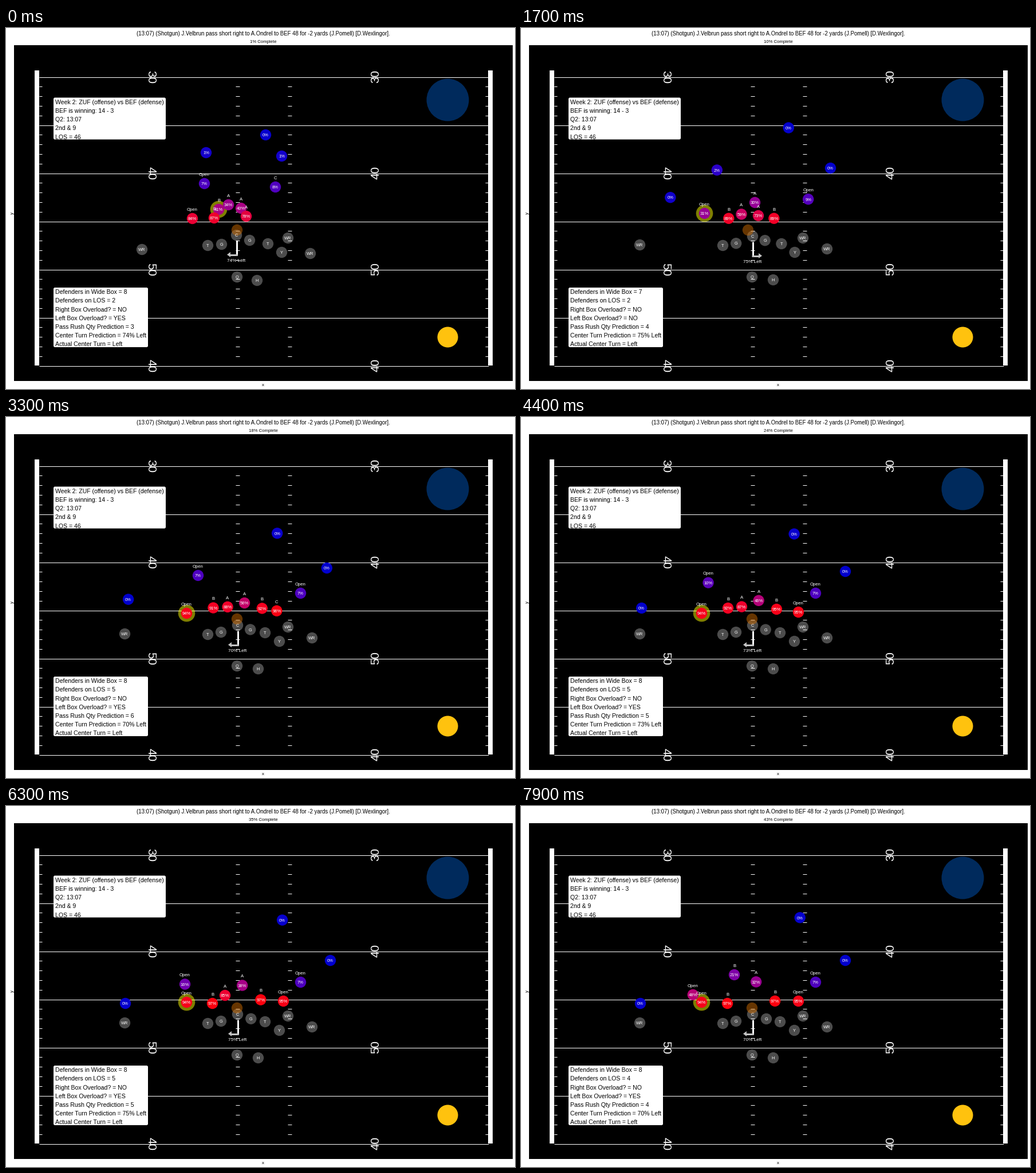
These frames come from a looping animation (889x630 px, 8000 ms). A matplotlib script:

```python
import numpy as np
import matplotlib.pyplot as plt
from matplotlib.animation import FuncAnimation
from matplotlib.patches import Circle, FancyBboxPatch, Polygon, Rectangle

W, H, DPI = 889, 630, 100
FRAMES, STEP = 80, 100
TOP, YARD = 85, 16.8
R = 9.7

plt.rcParams["font.family"] = "Liberation Sans"
fig = plt.figure(figsize=(W / DPI, H / DPI), dpi=DPI, facecolor="white")
ax = fig.add_axes([0, 0, 1, 1])
# Whole coordinates are pixel centres
ax.set_xlim(-0.5, W - 0.5)
ax.set_ylim(H - 0.5, -0.5)
ax.axis("off")


def pt(px):
    return px * 72 / DPI


def text(x, y, s, size, color="white", ha="center"):
    """Text whose capitals are centred on y."""
    return ax.text(x, y + 0.36 * size, s, size=pt(size), color=color, ha=ha,
                   va="baseline", zorder=10)


def turned(x, y, s, size, color, rot):
    ax.text(x, y, s, size=pt(size), color=color, rotation=rot, ha="center",
            va="baseline", rotation_mode="anchor", zorder=3)


def put(label, x, y):
    label.set_position((x, y + 0.36 * label.get_size() * DPI / 72))


def disc(r, color, z, alpha=1, at=(0, 0)):
    return ax.add_patch(Circle(at, r, fc=color, lw=0, alpha=alpha, zorder=z))


def rect(x0, y0, x1, y1, color):
    ax.add_patch(Rectangle((x0 - 0.5, y0 - 0.5), x1 - x0, y1 - y0, fc=color, lw=0))


def stroke(color):
    return ax.plot([], [], color=color, lw=pt(3), zorder=4,
                   solid_capstyle="butt")[0]


def text_box(x, y, w, h, lines):
    r = 2.5
    ax.add_patch(FancyBboxPatch(
        (x + r - 0.5, y + r - 0.5), w - 2 * r, h - 2 * r, fc="white", lw=0,
        boxstyle=f"round,pad={r},rounding_size={r}", zorder=4))
    return [text(x + 3, y + 7 + 15.2 * i, s, 10.55, "black", "left")
            for i, s in enumerate(lines)]


# Blue to red, blended in Lab space
M = np.array([[0.4124, 0.3576, 0.1805],
              [0.2126, 0.7152, 0.0722],
              [0.0193, 0.1192, 0.9505]])
WHITE = M.sum(axis=1)


def to_lab(rgb):
    c = np.array(rgb) / 255
    lin = np.where(c > 0.04045, ((c + 0.055) / 1.055) ** 2.4, c / 12.92)
    q = M @ lin / WHITE
    x, y, z = np.where(q > 0.008856, np.cbrt(q), 7.787 * q + 16 / 116)
    return np.array([116 * y - 16, 500 * (x - y), 200 * (y - z)])


def to_rgb(lab):
    y = (lab[0] + 16) / 116
    f = np.array([y + lab[1] / 500, y, y - lab[2] / 200])
    q = np.where(f > 0.2069, f ** 3, (f - 16 / 116) / 7.787)
    lin = np.clip(np.linalg.solve(M, q * WHITE), 0, 1)
    return np.where(lin > 0.0031308, 1.055 * lin ** (1 / 2.4) - 0.055, 12.92 * lin)


COLD, HOT = to_lab((0, 0, 205)), to_lab((255, 0, 0))


def heat(p):
    return tuple(np.clip(to_rgb(COLD + (HOT - COLD) * p), 0, 1))


class Path:
    """Walks from a start through stops (time, x, y), then stands still."""

    def __init__(self, start, *stops):
        self.t, self.x, self.y = zip((0, *start), *stops)

    def at(self, t):
        return np.interp(t, self.t, self.x), np.interp(t, self.t, self.y)


offense, defense = [], []


def blocker(name, *path):
    offense.append((Path(*path), disc(R, "white", 5, 0.3), text(0, 0, name, 7.4)))


def defender(*path):
    defense.append((Path(*path), disc(R, "blue", 8),
                    text(0, 0, "", 7.7), text(0, 0, "", 7.8)))


# Field
rect(14, 30, 885, 616, "black")
rect(50, 74, 58, 589, "white")
rect(842, 74, 850, 589, "white")
for n in range(31):
    y = TOP + YARD * n
    hashes = [(x, x + w) for x, w in ((57, 5), (400, 7), (491, 7), (836, 6))]
    for span in hashes if n % 5 else [(57, 842)]:
        ax.plot(span, [y, y], color="white", lw=pt(1), zorder=2,
                solid_capstyle="butt")
for n in range(0, 31, 10):
    mark, y = 50 - abs(n - 20), TOP + YARD * n - 0.5
    turned(247, y, mark, 20.8, "white", -90)
    turned(651, y, mark, 20.8, "white", 90)
disc(37, "#002a5c", 3, at=(771, 125))
disc(18, "#ffc20e", 3, at=(771, 539))

# Titles and notes
text(448.5, 9.5, "(13:07) (Shotgun) J.Velbrun pass short right to A.Ondrel to BEF 48 "
     "for -2 yards (J.Pomell) [D.Wexlingor].", 9.66, "black")
progress = text(448.5, 22.3, "", 7.8, "black")
text(448.5, 622, "x", 7.8, "black")
turned(12, 323, "y", 7.8, "black", 90)
text_box(83, 121.5, 196, 73, [
    "Week 2: ZUF (offense) vs BEF (defense)", "BEF is winning: 14 - 3",
    "Q2: 13:07", "2nd & 9", "LOS = 46"])
notes = text_box(83, 453, 165, 104, [""] * 7)

# Offense, left to right, then the backfield
blocker("WR", (237, 386), (1.5, 207, 378))
blocker("T", (352, 379))
blocker("G", (376, 377), (2, 375, 375))
blocker("C", (402, 361), (1.7, 404, 363))
blocker("G", (425, 370), (8, 428, 371))
blocker("T", (457, 376), (3.3, 452, 376))
blocker("Y", (481, 391), (2, 477, 391))
blocker("WR", (492, 366))
blocker("WR", (531, 393), (1, 534, 385))
blocker("Q", (403, 434))
blocker("H", (438, 440), (1, 440, 439))

# Defense: the first one wears the ring
defender((371, 316), (1.7, 320, 323), (3, 315, 342))
defender((453, 186), (1.5, 466, 170), (3.5, 474, 206), (8, 487, 194))
defender((349, 217), (3.3, 335, 276), (8, 299, 330))
defender((481, 223), (1.7, 540, 244), (3.8, 566, 269))
defender((346, 271), (2.6, 215, 308), (5.2, 208, 344))
defender((470, 277), (2.4, 514, 307))
defender((325, 332), (1.8, 388, 324), (3, 387, 331), (6.3, 382, 330), (7.9, 372, 294))
defender((363, 331), (4.4, 361, 333), (6, 360, 344))
defender((388, 308), (0.7, 387, 314), (1.7, 408, 304), (3.3, 416, 324), (8, 410, 306))
defender((410, 314), (1.7, 414, 327), (3, 447, 333), (8, 443, 340))
defender((419, 328), (0.7, 422, 328), (3.9, 484, 340))

ring = disc(14.8, "yellow", 7, 0.5)
ball = disc(R, "#cc6a00", 6, 0.5)
ball_path = Path((403, 352), (0.7, 396, 353), (1.8, 396, 352), (3, 403, 352))
stem, shaft = stroke("white"), stroke("#c4c4c4")
head = ax.add_patch(Polygon(np.zeros((3, 2)), fc="#c4c4c4", lw=0, zorder=4))
turn_text = text(0, 0, "", 8.2)


def rush_odds(dx, y):
    """Likely to rush when close to the line and not far outside."""
    depth = y - 323
    score = min(depth * (0.25 if depth > 0 else 0.045), 3.7)
    return 1 / (1 + np.exp(abs(dx / 90) ** 3 - score))


def gap(x, line):
    """Gap between the linemen that a defender faces."""
    tackle_l, guard_l, _, guard_r, tackle_r, end = line
    if guard_l < x < guard_r:
        return "A"
    if tackle_l < x < tackle_r:
        return "B"
    return "C" if tackle_r <= x < end else "Open"


def update(i):
    t = i * STEP / 1000
    progress.set_text(f"{round((i + 1) / 1.85)}% Complete")

    spots = [path.at(t) for path, _, _ in offense]
    for spot, (_, dot, name) in zip(spots, offense):
        dot.center = spot
        put(name, *spot)
    line = [x for x, _ in spots[1:7]]
    cx, cy = spots[3]

    boxed, on_line, rush = [], 0, 0
    for path, dot, pct, label in defense:
        x, y = path.at(t)
        p = rush_odds(x - cx, y)
        dot.center = x, y
        dot.set_facecolor(heat(p))
        pct.set_text(f"{p:.0%}")
        put(pct, x, y)
        put(label, x, y - 16.5)
        inside = y > 260 and abs(x - cx) < 125
        label.set_text(gap(x, line) if inside else "")
        if inside:
            boxed.append(x)
            on_line += y > 329
        rush += p > 0.5
    ring.center = defense[0][1].center
    ball.center = ball_path.at(t)

    left = sum(x < cx for x in boxed)
    heavy_left, heavy_right = left >= 4, len(boxed) - left >= 5
    turn = f"{73 + 3.5 * np.cos(2 * np.pi * (t - 0.9) / 4.65):.0f}% Left"
    answer = ("NO", "YES")
    for note, s in zip(notes, [
            f"Defenders in Wide Box = {len(boxed)}",
            f"Defenders on LOS = {on_line}",
            f"Right Box Overload? = {answer[heavy_right]}",
            f"Left Box Overload? = {answer[heavy_left]}",
            f"Pass Rush Qty Prediction = {rush}",
            f"Center Turn Prediction = {turn}",
            "Actual Center Turn = Left"]):
        note.set_text(s)

    side = -1 if heavy_left else 1
    ay, tip = cy + 34, cx + 16.5 * side
    stem.set_data([cx, cx], [cy + R, ay + 1.5])
    shaft.set_data([cx - 1.5 * side, tip - 5 * side], [ay, ay])
    head.set_xy([(tip, ay), (tip - 6 * side, ay - 4.5), (tip - 6 * side, ay + 4.5)])
    turn_text.set_text(turn)
    put(turn_text, cx, cy + 43.7)
    return []


anim = FuncAnimation(fig, update, frames=FRAMES, interval=STEP, repeat=True,
                     repeat_delay=0, blit=False)
plt.show()
```
